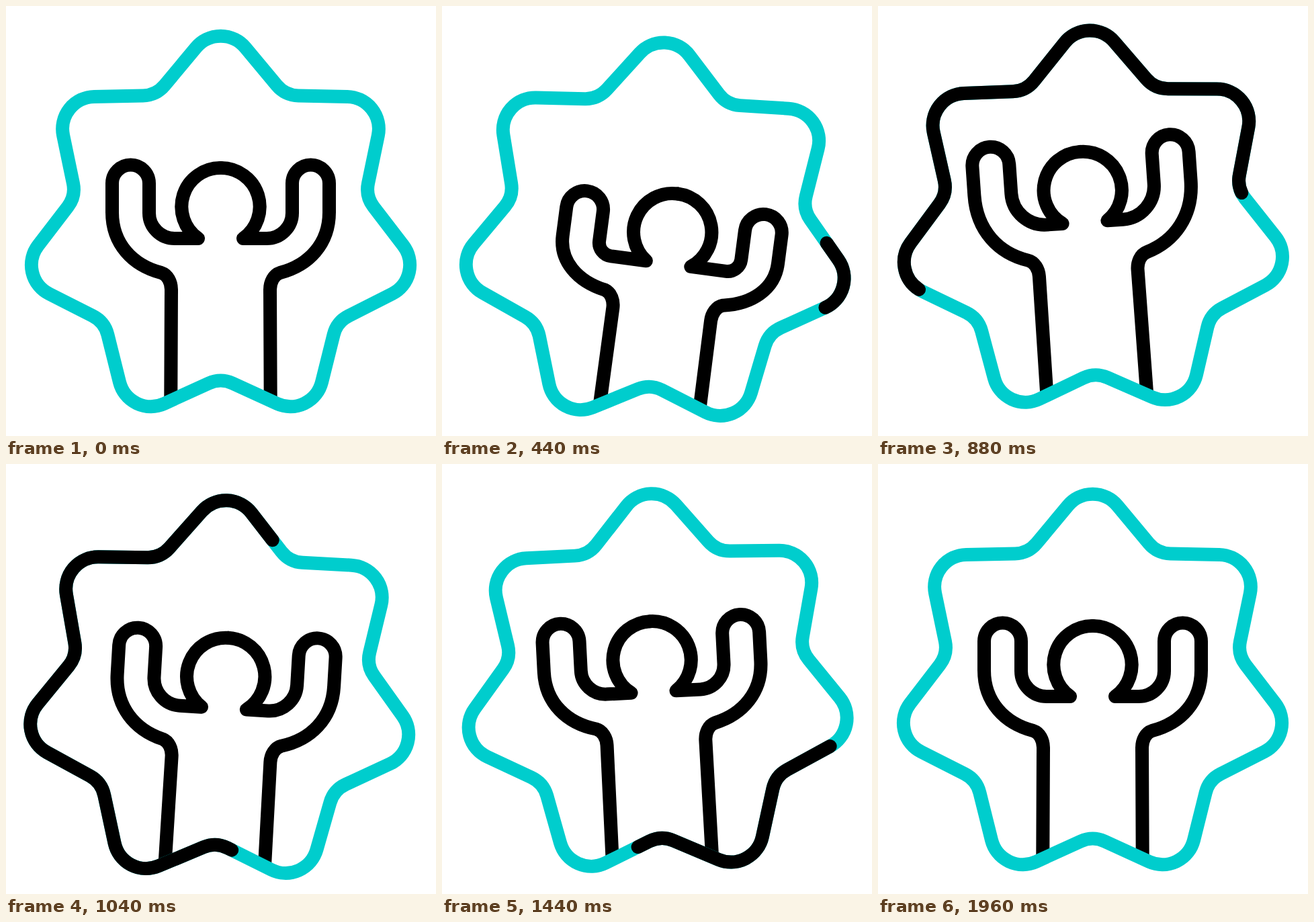
Write an HTML page that moves like this. It is 640 px wide and 640 px high and loops after 2320 ms.

```html
<!DOCTYPE html>
<html lang="en">
<head>
<meta charset="utf-8">
<title>Cheering figure in a star badge</title>
<style>
  html, body { margin: 0; width: 100%; height: 100%; overflow: hidden; background: #fff; }
  svg { display: block; width: 100vw; height: 100vh; }
  path { fill: none; stroke: #000; stroke-width: 20; stroke-linecap: round; stroke-linejoin: round; }
  #ring { stroke: #00cdcd; }
</style>
</head>
<body>
<svg viewBox="0 0 640 640">
  <defs><clipPath id="inside"><path id="clip"/></clipPath></defs>
  <g id="badge">
    <g clip-path="url(#inside)">
      <g id="man">
        <path id="left"/>
        <path id="right" transform="scale(-1 1)"/>
      </g>
    </g>
    <path id="ring"/>
    <path id="trace"/>
  </g>
</svg>
<script>
const LOOP = 2320, STEP = 40;
const CX = 319.5, CY = 332.3, HEAD_Y = 298.5;
const el = id => document.getElementById(id);
const smooth = u => { u = Math.min(1, Math.max(0, u)); return u * u * (3 - 2 * u); };

// Eased value through [time, value] turning points.
function track(points, t) {
  let value = points[0][1];
  for (let i = 1; i < points.length; i++) {
    const [t0, v0] = points[i - 1], [t1, v1] = points[i];
    if (t >= t0) value = v0 + (v1 - v0) * smooth((t - t0) / (t1 - t0));
  }
  return value;
}

const badgeTurn = [[0, 0], [320, 4.6], [690, -4], [1070, 2], [1390, -1.9], [1680, 0]];
const badgeDrop = [[0, 0], [320, 21], [690, -25.6], [1080, 10.5], [1400, -.5], [1680, 0]];
const manSway = [[0, 0], [440, 5], [780, -4.3], [1140, 2.8], [1560, -2.2], [1960, 0]];
const armDrop = [[0, 0], [400, 18.5], [860, -12], [1240, 8], [1620, -4.5], [1960, 0]];

// Seven rounded tips and valleys joined by straight tangents, counterclockwise.
function starPath() {
  const tip = 239.6, tipR = 48, valley = 268.4, valleyR = 43;
  const half = Math.PI / 7;
  const dx = valley * Math.sin(half), dy = tip - valley * Math.cos(half);
  const slope = Math.asin((tipR + valleyR) / Math.hypot(dx, dy)) + Math.atan2(dy, dx);
  const at = (axis, dist, angle, r) =>
    (dist * Math.cos(axis) + r * Math.cos(angle)).toFixed(2) + " " +
    (dist * Math.sin(axis) + r * Math.sin(angle)).toFixed(2);
  let d = "";
  for (let i = 0; i < 7; i++) {
    const a = half / 2 - i * 2 * half, v = a - half, bend = slope - half;
    d += (i ? "L" : "M") + at(a, tip, a + slope, tipR)
      + `A${tipR} ${tipR} 0 0 0 ` + at(a, tip, a - slope, tipR)
      + "L" + at(v, valley, v + Math.PI - bend, valleyR)
      + `A${valleyR} ${valleyR} 0 0 1 ` + at(v, valley, v + Math.PI + bend, valleyR);
  }
  return d + "Z";
}

// Left half of the figure; `drop` lowers the hand and tightens the elbow.
function halfMan(drop) {
  const hand = 264 + drop, elbow = 38 - drop;
  return `M0 241A57.7 57.7 0 0 0 -33.5 346H${-106.5 + elbow}`
    + `A${elbow} ${elbow} 0 0 1 -106.5 ${346 - elbow}V${hand}`
    + `A27.5 27.5 0 0 0 -161.5 ${hand}V${307 + drop}`
    + `C-161.5 ${354 + drop * .5} -131 ${386 + drop * .2} -88.5 397`
    + `C-79 400 -73.5 411 -73.5 422L-74.8 720`;
}

const star = starPath();
for (const id of ["clip", "ring", "trace"]) {
  el(id).setAttribute("d", star);
  el(id).setAttribute("transform", `translate(${CX} ${CY})`);
}
const length = el("ring").getTotalLength();

function draw(t) {
  el("badge").setAttribute("transform",
    `translate(0 ${track(badgeDrop, t)}) rotate(${track(badgeTurn, t)} ${CX} ${CY})`);

  const sway = track(manSway, t);
  el("man").setAttribute("transform",
    `translate(${CX + 4.7 * sway} ${5.5 * sway}) rotate(${sway} 0 ${HEAD_Y})`);
  const body = halfMan(track(armDrop, t));
  el("left").setAttribute("d", body);
  el("right").setAttribute("d", body);

  const front = smooth((t - 284) / 1035) * length;
  const back = smooth((t - 681) / 1080) * length;
  const trace = el("trace");
  trace.style.display = front > back ? "" : "none";
  trace.setAttribute("stroke-dasharray", `${front - back} ${length * 2}`);
  trace.setAttribute("stroke-dashoffset", -back);
}

const start = performance.now();
function tick() {
  const t = (performance.now() - start) % LOOP;
  draw(Math.floor(t / STEP) * STEP);
  requestAnimationFrame(tick);
}
draw(0);
requestAnimationFrame(tick);
</script>
</body>
</html>
```
